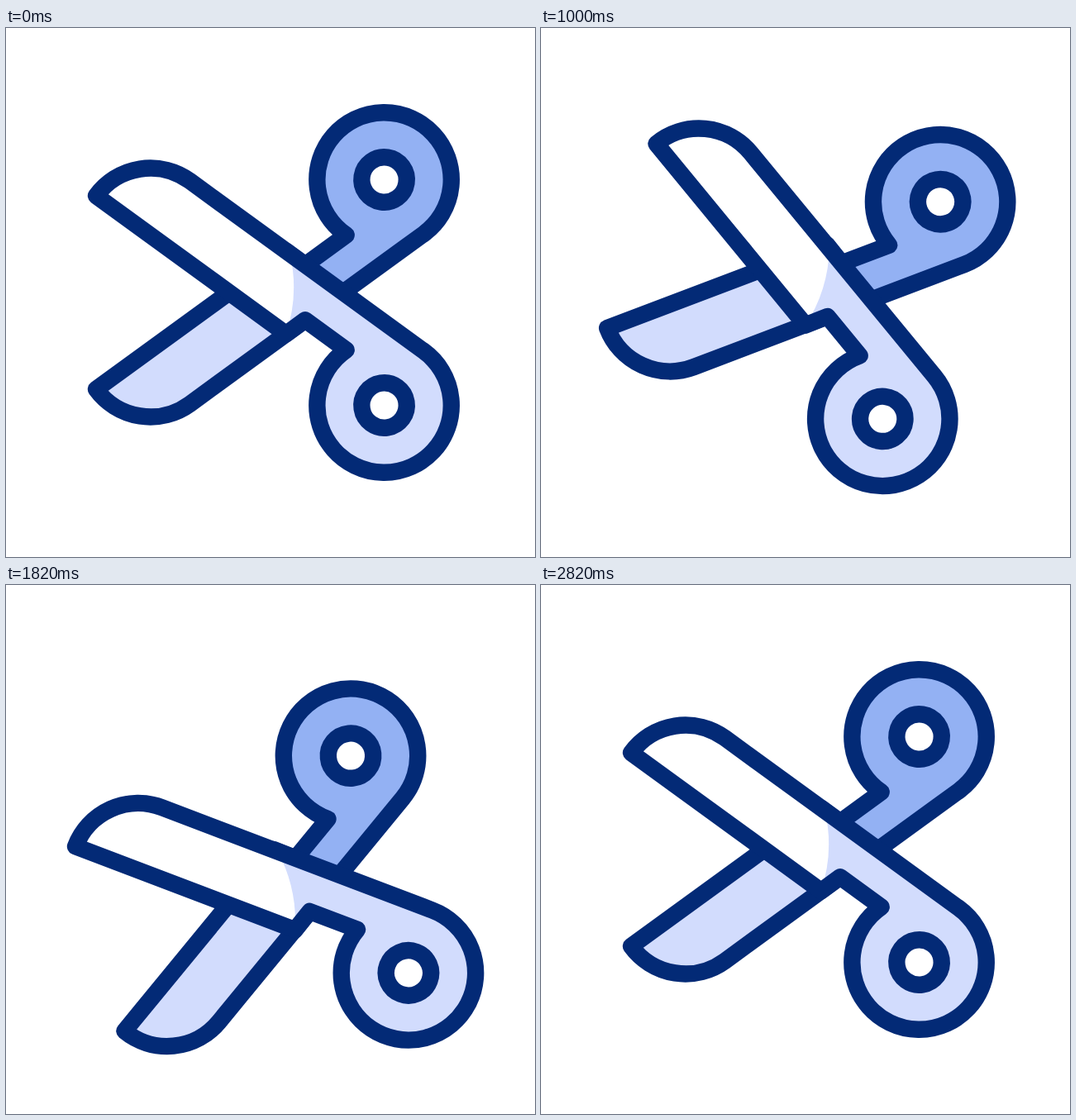
Write an HTML page that moves like this. It is 640 by 640 pixels and loops after 3.6 s.

```html
<!DOCTYPE html>
<html lang="en">
<head>
<meta charset="utf-8">
<title>Scissors</title>
<style>
  html, body { margin: 0; width: 100%; height: 100%; overflow: hidden; background: #fff; }
  svg { display: block; width: 100vw; height: 100vh; }
  .line { fill: none; stroke: #032a76; stroke-width: 20.4; stroke-linejoin: round; }
</style>
</head>
<body>
<svg id="stage" viewBox="0 0 640 640"></svg>
<script>
const LOOP = 3600, STEP = 20, SWING = 940, CLOSE = 460, SHUT = 23.2;

// Pivot position and tilt at the start of each swing
const poses = [
  { x: 361, y: 320, tilt: 0 },
  { x: 354.4, y: 316.1, tilt: 15 },
  { x: 358.3, y: 363.4, tilt: -15 },
  { x: 361, y: 320, tilt: 0 }
];

// Blade drawn along the x axis, tip at the origin
const outline = 'M0 0A81.2 81.2 0 0 1 81.2-81.2H431A81.2 81.2 0 1 1 354.5-27.2H293L284.2 0Z';
const tipArea = 'M0 0A81.2 81.2 0 0 1 81.2-81.2H231Q269-48 284.2 0Z';

const blade = (id, handle, tip) => `
  <g id="${id}"><g transform="translate(-252 -117) rotate(36.03)">
    <path d="${outline}" fill="${handle}"/>
    <path d="${tipArea}" fill="${tip}"/>
    <path d="${outline}" class="line"/>
    <circle cx="431" r="27.2" fill="#fff"/>
    <circle cx="431" r="27.2" class="line"/>
  </g></g>`;

const stage = document.getElementById('stage');
stage.innerHTML = blade('back', '#93b1f3', '#d2dcfd') + blade('front', '#d2dcfd', '#fff');
const back = document.getElementById('back');
const front = document.getElementById('front');

const mix = (a, b, k) => a + (b - a) * k;
const glide = p => p < 0.5 ? 2 * p * p : 1 - 2 * (1 - p) ** 2;

// cubic-bezier(.65, 0, .35, 1)
function ease(p) {
  let lo = 0, hi = 1, s;
  for (let i = 0; i < 24; i++) {
    s = (lo + hi) / 2;
    const r = 1 - s;
    if (1.95 * s * r * r + 1.05 * s * s * r + s ** 3 < p) lo = s; else hi = s;
  }
  return s * s * (3 - 2 * s);
}

function draw(now) {
  const t = Math.min(Math.floor(now % LOOP / STEP) * STEP, 3 * SWING);
  const n = Math.min(Math.floor(t / SWING), 2);
  const local = t - n * SWING, p = local / SWING;
  const a = poses[n], b = poses[n + 1];

  const bow = n === 1 ? 1.9 * Math.sin(Math.PI * p) : 0;
  const x = mix(a.x, b.x, glide(p)) - bow;
  const y = mix(a.y, b.y, glide(p));
  const tilt = mix(a.tilt, b.tilt, ease(p));
  const shut = SHUT * (local < CLOSE
    ? ease(local / CLOSE)
    : 1 - ease((local - CLOSE) / (SWING - CLOSE)));

  front.setAttribute('transform', `translate(${x} ${y}) rotate(${tilt - shut})`);
  back.setAttribute('transform', `translate(${x} ${y}) rotate(${tilt + shut}) scale(1 -1)`);
}

const start = performance.now();
function tick() {
  draw(performance.now() - start);
  requestAnimationFrame(tick);
}
tick();
</script>
</body>
</html>
```
